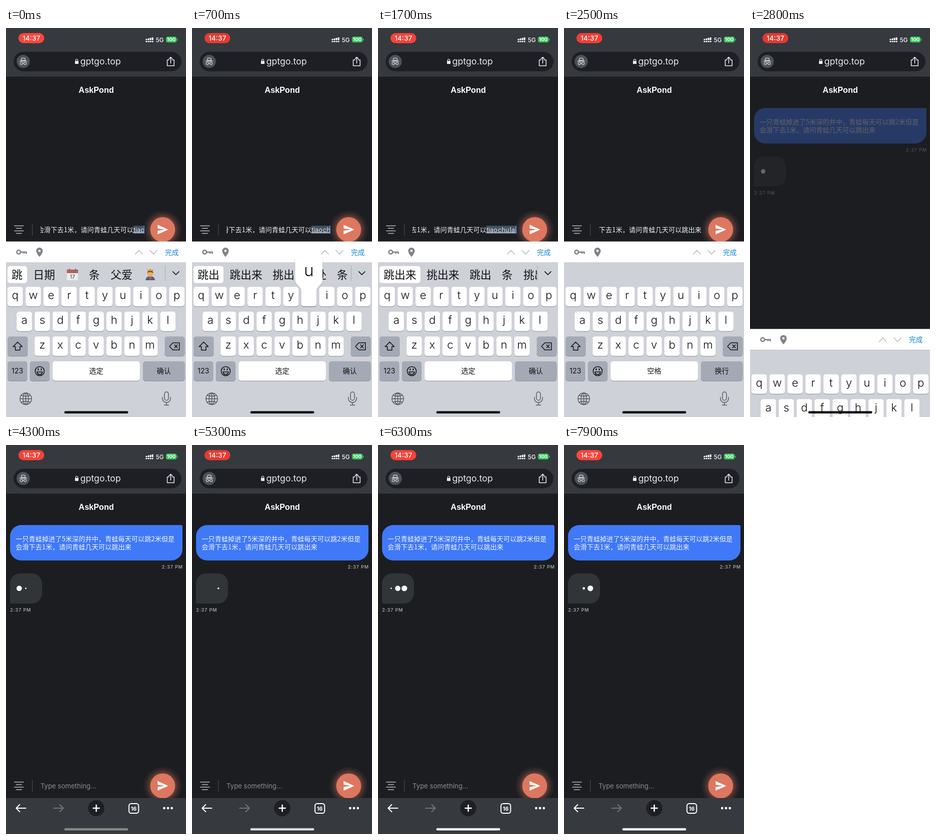
An HTML page for the animation above (8 s loop, 355x768 px).

```html
<!DOCTYPE html>
<html lang="zh">
<head>
<meta charset="utf-8">
<style>
html, body { margin: 0; width: 100%; height: 100%; overflow: hidden; background: #1c1d21; }
svg { display: block; width: 355px; height: 768px; }
text { font-family: Inter, "Noto Sans CJK SC", "Noto Sans CJK", sans-serif; white-space: pre; }
.title { font-family: "Liberation Sans", sans-serif; font-size: 16px; font-weight: 700; }
.cjk { font-family: "Noto Sans CJK SC", "Noto Sans CJK", sans-serif; }
.mid { text-anchor: middle; }
.end { text-anchor: end; }
.line { fill: none; stroke-linecap: round; stroke-linejoin: round; }
.time { font-size: 9px; font-weight: 600; letter-spacing: .85px; fill: #a0a2a6; }
</style>
</head>
<body>
<svg viewBox="0 0 355 768">
  <defs>
    <clipPath id="fieldClip"><rect x="68" y="380" width="205.5" height="36"/></clipPath>
    <clipPath id="candClip"><rect x="0" y="462" width="314" height="48"/></clipPath>
    <clipPath id="pageClip"><rect y="96" width="355" height="601"/></clipPath>
    <radialGradient id="glow">
      <stop offset=".6" stop-color="#dd775f" stop-opacity=".42"/>
      <stop offset=".8" stop-color="#dd775f" stop-opacity=".15"/>
      <stop offset="1" stop-color="#dd775f" stop-opacity="0"/>
    </radialGradient>
  </defs>

  <rect width="355" height="768" fill="#1c1d21"/>
  <text class="title mid" x="178" y="128" fill="#fff">AskPond</text>

  <g id="chat">
    <path d="M30 158H345Q348 158 348 161V206A22 22 0 0 1 326 228H30A22 22 0 0 1 8 206V180A22 22 0 0 1 30 158Z" fill="#3f79f8"/>
    <g font-size="13" fill="#f2f5ff">
      <text class="cjk" x="19" y="189.5">一只青蛙掉进了5米深的井中，青蛙每天可以跳2米但是</text>
      <text class="cjk" x="19" y="205.5">会滑下去1米，请问青蛙几天可以跳出来</text>
    </g>
    <text class="time end" x="349" y="243.5">2:37 PM</text>
    <path d="M28 253.5H51A20 20 0 0 1 71 273.5V293A20 20 0 0 1 51 313H10Q8 313 8 311V273.5A20 20 0 0 1 28 253.5Z" fill="#313538"/>
    <g id="dots" fill="#fff"></g>
    <text class="time" x="8" y="329">2:37 PM</text>
  </g>

  <g clip-path="url(#pageClip)">
    <g id="inputBar">
      <path class="line" d="M16.5 390.5H34.5M20 395.5H31M16.5 400.5H34.5M20 405.5H31" stroke="#b4b6b9" stroke-width="1.3"/>
      <path d="M52 386V410" stroke="#3e4146" stroke-width="1.5"/>
      <text id="hint" x="68" y="402.5" font-size="13" fill="#8c8e92">Type something...</text>
      <g clip-path="url(#fieldClip)">
        <rect id="mark" y="390.5" height="15.5" fill="#465362"/>
        <text id="typed" class="cjk end" y="402.5" font-size="13" fill="#eceef0"></text>
        <text id="pinyin" class="end" x="273" y="402.5" font-size="12.6" fill="#dfe3e8" text-decoration="underline"></text>
        <rect id="caret" x="271.5" y="390" width="1.6" height="16" fill="#3f8cf0"/>
      </g>
      <circle cx="309" cy="398" r="39" fill="url(#glow)"/>
      <circle cx="309" cy="398" r="24.5" fill="#dd775f"/>
      <path d="M299 388.5L320 398L299 407.5V400.2L313 398L299 395.8Z" fill="#fff"/>
    </g>
  </g>

  <g>
    <rect y="697" width="355" height="71" fill="#36393e"/>
    <g class="line" stroke-width="2">
      <path d="M39 717H20M27 710L20 717L27 724" stroke="#fff"/>
      <path d="M94 717H113M106 710L113 717L106 724" stroke="#71757a"/>
      <circle cx="178" cy="717" r="16" fill="#1e1f24"/>
      <path d="M172 717H184M178 711V723" stroke="#fff" stroke-width="2.5"/>
      <rect x="242.5" y="708" width="19" height="19" rx="4.5" stroke="#fff"/>
    </g>
    <text class="mid" x="252" y="721.5" font-size="10.5" font-weight="700" fill="#fff">16</text>
    <g fill="#fff"><circle cx="312" cy="717" r="2.4"/><circle cx="319.5" cy="717" r="2.4"/><circle cx="327" cy="717" r="2.4"/></g>
  </g>

  <g id="keyboard">
    <rect y="421.5" width="355" height="41.5" fill="#fff"/>
    <g class="line" stroke="#808389" stroke-width="2.5">
      <circle cx="25" cy="442.5" r="3.7"/><path d="M29 442.5H40V446M35.5 443V445.5" stroke-linecap="butt"/>
    </g>
    <path d="M66 452Q59.5 444.5 59.5 440A6.5 6.5 0 0 1 72.5 440Q72.5 444.5 66 452Z" fill="#808389"/>
    <circle cx="66" cy="440" r="2.3" fill="#fff"/>
    <path class="line" d="M255 446.5L262 439L269 446.5M284 439L291 446.5L298 439" stroke="#b8babd" stroke-width="1.5"/>
    <text class="cjk" x="313.5" y="447.5" font-size="13.5" fill="#1c84d8">完成</text>
    <rect y="462.5" width="355" height="306" fill="#cfd1d8"/>
    <g id="candidates">
      <g id="candList" clip-path="url(#candClip)"></g>
      <path d="M314 469V499" stroke="#a9acb3"/>
      <path class="line" d="M329 481L335 487L341 481" stroke="#111" stroke-width="1.7"/>
    </g>
    <g id="keys"></g>
    <g class="line" stroke="#111" stroke-width="1.5">
      <path d="M23 620L32 629H27.5V636H18.5V629H14Z"/>
      <path d="M329 621.5H342V635.5H329L322.5 628.5ZM332.5 625.5L338 631.5M338 625.5L332.5 631.5"/>
      <circle cx="66.5" cy="677.5" r="9"/>
      <path d="M61 679H72Q71 684 66.5 684T61 679Z"/>
      <path d="M63.5 673V675M69.5 673V675" stroke-width="2"/>
    </g>
    <g class="line" stroke="#55585e" stroke-width="1.4">
      <circle cx="39" cy="732" r="11.5"/><ellipse cx="39" cy="732" rx="5.5" ry="11.5"/>
      <path d="M39 720.5V743.5M27.5 732H50.5M30 725Q39 729 48 725M30 739Q39 735 48 739"/>
      <rect x="312.5" y="718.5" width="8" height="16.5" rx="4"/>
      <path d="M308.5 729V731.5A8 8 0 0 0 324.5 731.5V729M316.5 739.5V744.5M312 744.5H321"/>
    </g>
    <g id="popup">
      <path d="M-21 452H21Q27 452 27 458V497C27 508 15 510 15 520V544Q15 549 10 549H-10Q-15 549 -15 544V520C-15 510 -27 508 -27 497V458Q-27 452 -21 452Z" fill="#fff" style="filter:drop-shadow(0 1px 1px #0003)"/>
      <text id="popLetter" class="mid" y="490" font-size="33" font-weight="300" fill="#111"></text>
    </g>
  </g>

  <rect id="home" x="115" y="756.5" width="126" height="4.5" rx="2.25"/>

  <rect width="355" height="96" fill="#36393e"/>
  <rect id="recPill" x="24.5" y="10" width="51" height="20" rx="10"/>
  <text class="mid" x="50" y="24.8" font-size="13.5" font-weight="500" fill="#fff">14:37</text>
  <g id="signal" fill="#fff"></g>
  <text x="295.5" y="27.5" font-size="11.5" font-weight="500" fill="#fff">5G</text>
  <rect x="315.5" y="17" width="21" height="11.5" rx="3.5" fill="#35c759"/>
  <path d="M338 21V25" stroke="#35c759" stroke-width="1.5"/>
  <text class="mid" x="326" y="26.2" font-size="9.5" font-weight="700" fill="#fff">100</text>
  <rect x="15" y="47" width="331" height="38.5" rx="19.25" fill="#1e1f24"/>
  <circle cx="34" cy="66" r="13" fill="#4c5256"/>
  <g class="line" stroke="#c5c8ca" stroke-width="1.3">
    <path d="M27 65.5H41M29.5 64L31 59.5H37L38.5 64Z"/>
    <circle cx="30.3" cy="70" r="2.4"/><circle cx="37.7" cy="70" r="2.4"/><path d="M32.7 69.5H35.3"/>
  </g>
  <rect x="136" y="65" width="7" height="6" rx="1" fill="#e8eaed"/>
  <path class="line" d="M137.5 65V63.5A2 2 0 0 1 141.5 63.5V65" stroke="#e8eaed" stroke-width="1.2"/>
  <text x="146.5" y="72" font-size="17.5" fill="#e8eaed">gptgo.top</text>
  <path class="line" d="M321.5 63H318V74.5H331.5V63H328M324.8 69.5V57.5M321.3 61L324.8 57.5L328.3 61" stroke="#e8eaed" stroke-width="1.5"/>
</svg>

<script>
const LOOP = 8000, STEP = 100, SENT = 2700, COMMIT = 2100;
const $ = id => document.getElementById(id);
const clamp = x => Math.max(0, Math.min(1, x));
const show = (id, on) => $(id).style.display = on ? "" : "none";

const QUESTION = "会滑下去1米，请问青蛙几天可以";
const CALENDAR = "calendar", PRINCE = "prince";

// Start time, composed letters, suggestions
const TYPING = [
  [0, "tiao", ["跳", "日期", CALENDAR, "条", "父爱", PRINCE]],
  [300, "tiao c", ["跳出", "跳成", "挑出", "条", "调查"]],
  [500, "tiao ch", ["跳出", "跳出来", "挑出", "挑处", "条"]],
  [800, "tiao chu", ["跳出", "跳出来", "挑出", "挑处", "条"]],
  [1200, "tiao chu l", ["跳出来", "挑出来", "跳出", "条", "挑出"]],
  [1400, "tiao chu la", ["跳出来", "挑出来", "跳出", "条", "挑出"]],
  [1600, "tiao chu lai", ["跳出来", "挑出来", "跳出", "条", "挑出"]],
];
const PRESSES = [["c", 100], ["h", 300], ["u", 600], ["l", 1000], ["a", 1200], ["i", 1500]];

const EMOJI = {
  [CALENDAR]: x => `<g transform="translate(${x + 14} 487)">
    <rect x="-11" y="-10" width="22" height="21" rx="1" fill="#ececec"/>
    <path d="M-11 -3V-10H11V-3Z" fill="#b4605c"/>
    <path d="M-6 -12V-7M6 -12V-7" stroke="#777" stroke-width="2"/>
    <text class="mid" y="8" font-size="10.5" fill="#444">17</text></g>`,
  [PRINCE]: x => `<g transform="translate(${x + 15} 487)">
    <path d="M-9 11Q-9 3 0 3T9 11Z" fill="#4a5f86"/>
    <path d="M-4 4L0 11L5 4Z" fill="#b9564a"/>
    <circle cy="-2" r="6" fill="#e0b45a"/>
    <path d="M-6 -3Q-6 -8 0 -8T6 -3L3 -5H-4Z" fill="#704629"/>
    <path d="M-5 -7L-6 -11L-3 -9L0 -12L3 -9L6 -11L5 -7Z" fill="#d69c35"/></g>`,
};

const keyCentre = {};
function keyCap(x, y, w, label, { fill = "#fff", size = 22, weight = 300, id = "" } = {}) {
  const baseline = y + 24.4;
  return `<rect x="${x}" y="${y + 1}" width="${w}" height="38.5" rx="5" fill="#898c93"/>
    <rect x="${x}" y="${y}" width="${w}" height="38.5" rx="5" fill="${fill}"/>
    <text ${id && `id="${id}"`} class="mid" x="${x + w / 2}" y="${baseline}" font-size="${size}" font-weight="${weight}" fill="#111">${label}</text>`;
}

function buildKeys() {
  let out = "";
  [["qwertyuiop", 3, 511], ["asdfghjkl", 21, 560], ["zxcvbnm", 56.3, 609]].forEach(([letters, left, y]) =>
    [...letters].forEach((letter, i) => {
      const x = left + 35.4 * i;
      keyCentre[letter] = [x + 15, y - 511];
      out += keyCap(x, y, 30.4, letter);
    }));
  const plain = { size: 14, weight: 400 }, dark = { ...plain, fill: "#a4aab5" };
  out += keyCap(3, 609, 40, "", dark) + keyCap(313, 609, 39.5, "", dark);
  out += keyCap(3, 658, 39, "123", dark) + keyCap(47, 658, 39, "", dark);
  out += keyCap(92, 658, 172, "选定", { ...plain, id: "space" });
  out += keyCap(270, 658, 82.5, "确认", { ...dark, id: "enter" });
  $("keys").innerHTML = out;
}

function candidateRow(words) {
  let x = 11, out = "";
  words.forEach((word, i) => {
    const emoji = EMOJI[word];
    const w = emoji ? 26 : Math.max(22.5, word.length * 21.5);
    if (!i) out += `<rect x="3" y="470" width="${w + 16}" height="33.5" rx="5" fill="#fff"/>`;
    out += emoji ? emoji(x) : `<text class="cjk" x="${x}" y="494.5" font-size="21.5" font-weight="350" fill="#111">${word}</text>`;
    x += w + 20.3;
  });
  return out;
}

// Each dot swells, holds, then shrinks
function dotScale(t, i) {
  const period = 1430, ramp = 440, hold = 214;
  const p = (t - 3922 - i * 225 + period * 4) % period;
  const u = p < ramp + hold ? clamp(p / ramp) : 1 - clamp((p - ramp - hold) / ramp);
  return (1 - Math.cos(Math.PI * u)) / 2;
}

function drawField(t) {
  const composing = t < COMMIT, sent = t >= SENT;
  const [, letters, words] = TYPING.filter(s => s[0] <= t).pop();
  const pinyin = $("pinyin");
  pinyin.textContent = composing ? letters.replace(/ /g, "\u200a") : "";
  const w = composing ? pinyin.getComputedTextLength() : 0;
  $("mark").setAttribute("x", 273 - w);
  $("mark").setAttribute("width", w);
  $("typed").setAttribute("x", 273 - w - (composing ? 0 : 2));
  $("typed").textContent = sent ? "" : QUESTION + (composing ? "" : "跳出来");
  show("hint", sent);
  show("caret", !sent && (composing || t % 1000 < 500));
  show("candidates", composing);
  $("candList").innerHTML = composing ? candidateRow(words) : "";
  $("space").textContent = composing ? "选定" : "空格";
  $("enter").textContent = composing ? "确认" : "换行";
}

function drawPopup(t) {
  const press = PRESSES.find(([, at]) => t >= at && t < at + 200);
  show("popup", press);
  if (!press) return;
  $("popLetter").textContent = press[0];
  $("popup").setAttribute("transform", `translate(${keyCentre[press[0]]})`);
}

function render(t) {
  drawField(t);
  drawPopup(t);

  const slide = 1 - (1 - clamp((t - SENT) / 486)) ** 3;
  $("keyboard").setAttribute("transform", `translate(0 ${346 * slide})`);
  show("keyboard", slide < 1);
  $("inputBar").setAttribute("transform", `translate(0 ${t > SENT ? 275 : 0})`);

  $("chat").style.opacity = clamp((t - SENT) / 310);
  [...$("dots").children].forEach((dot, i) => dot.setAttribute("r", 5.6 * dotScale(t, i)));

  const grey = 135 + 120 * clamp((t - 4500) / 1100);
  $("home").setAttribute("fill", t < 3000 ? "#000" : `rgb(${grey},${grey},${grey})`);

  const pulse = (1 + Math.cos(Math.PI * t / 1000)) / 2;
  $("recPill").setAttribute("fill", `rgb(${222 + 33 * pulse},${56 + 13 * pulse},${48 + 10 * pulse})`);
}

buildKeys();
$("dots").innerHTML = [26, 39, 52].map(x => `<circle cx="${x}" cy="283"/>`).join("");
$("signal").innerHTML = [0, 1, 2, 3].map(i =>
  `<rect x="${275.5 + 4 * i}" y="${21.5 - i}" width="3" height="${2.5 + i}" rx=".8"/>
   <rect x="${275.5 + 4 * i}" y="25.5" width="3" height="2.5" rx=".8"/>`).join("");

const start = performance.now();
function tick() {
  const t = (performance.now() - start) % LOOP;
  render(Math.floor(t / STEP) * STEP);
  requestAnimationFrame(tick);
}
tick();
</script>
</body>
</html>
```
